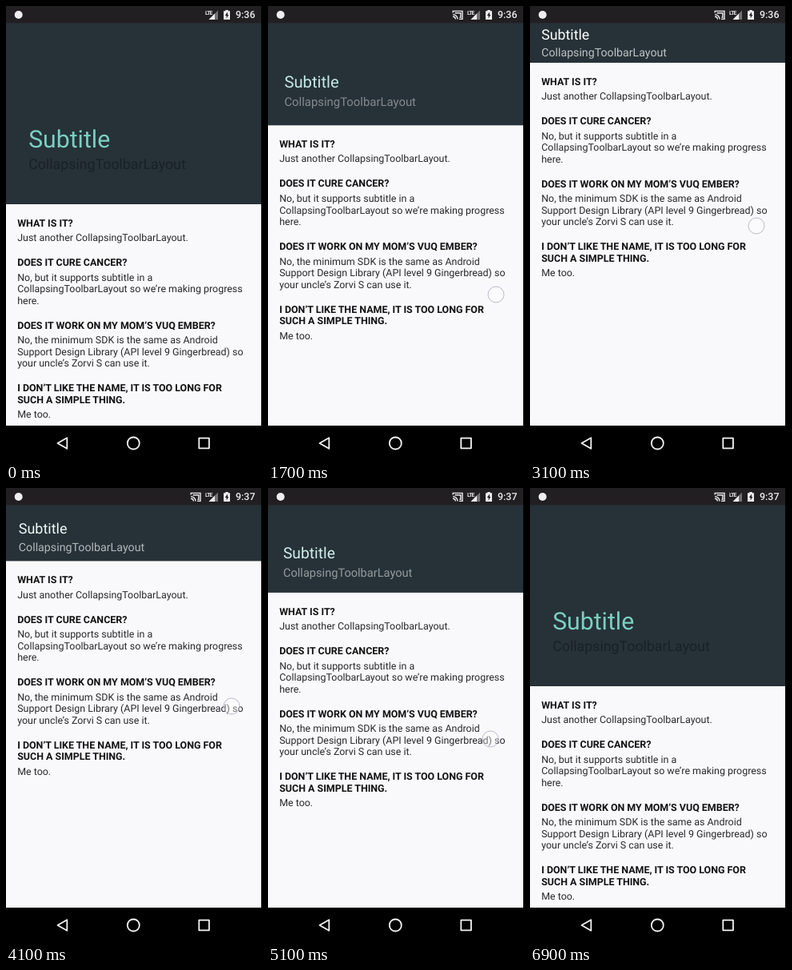
These frames come from a looping animation (320x568 px, 7000 ms). An HTML page:

```html
<!DOCTYPE html>
<html lang="en">
<head>
<meta charset="utf-8">
<title>Collapsing toolbar with subtitle</title>
<style>
  html, body { margin: 0; width: 100%; height: 100%; overflow: hidden; background: #000; }
  svg { display: block; width: 320px; height: 568px; }
  text { font-family: Roboto, sans-serif; text-rendering: geometricPrecision; white-space: pre; }
  #content text { font-size: 12.44px; fill: #29282b; }
  #content .heading { font-weight: 700; fill: #111; }
</style>
</head>
<body>
<svg viewBox="0 0 320 568">
  <rect width="320" height="568" fill="#f9f8fa"/>
  <g id="content"></g>
  <rect id="header" width="320" fill="#263238"/>
  <text id="title">Subtitle</text>
  <text id="subtitle">CollapsingToolbarLayout</text>

  <rect width="320" height="21.3" fill="#221f22"/>
  <g fill="#eee">
    <circle cx="15.7" cy="11" r="5"/>
    <g id="cast" fill="none" stroke="#eee" stroke-width="1.4">
      <path d="M231.2 8.5V6.4H243V16.4H239M231 10.6a6 6 0 0 1 6 6M231 13.2a3.4 3.4 0 0 1 3.4 3.4"/>
      <path d="M233.5 8.8H240.8V14.2H239.5"/>
    </g>
    <text x="249" y="10.8" font-size="6.8" font-weight="700" letter-spacing="-.8">LTE</text>
    <path d="M265 5.5V17H253.5Z" opacity=".4"/>
    <path d="M261 9.5V17H253.5Z"/>
    <path d="M274.3 6.2V5H277.7V6.2H280V17H272V6.2Z"/>
    <path d="M277 7.5L273.8 12H275.6V15.5L278.4 11H277Z" fill="#221f22"/>
    <text id="clock" x="287" y="15.4" font-size="12.44" font-weight="500"></text>
  </g>

  <rect y="525" width="320" height="43"/>
  <rect x="319" width="1" height="568"/>
  <g fill="none" stroke="#f4f4f4" stroke-width="1.8" stroke-linejoin="round">
    <path d="M64.5 547L76.3 540.2V553.8Z"/>
    <circle cx="159.3" cy="547" r="7.5"/>
    <rect x="241.3" y="540.7" width="12.6" height="12.6"/>
  </g>
  <circle id="touch" r="10" fill="#fff" fill-opacity=".35" stroke="#a3a9bd" stroke-opacity=".75"/>
</svg>
<script>
const LOOP = 7000, STEP = 100;
const COLLAPSED = 70, EXPANDED = 247;
const $ = id => document.getElementById(id);
const set = (el, attrs) => { for (const k in attrs) el.setAttribute(k, attrs[k]); };
const lerp = (a, b, p) => a + (b - a) * p;
const mix = (a, b, p) => `rgb(${a.map((v, i) => Math.round(lerp(v, b[i], p)))})`;

// Each block: heading lines, then body lines
const blocks = [
  [['WHAT IS IT?'], ['Just another CollapsingToolbarLayout.']],
  [['DOES IT CURE CANCER?'],
   ['No, but it supports subtitle in a', 'CollapsingToolbarLayout so we’re making progress', 'here.']],
  [['DOES IT WORK ON MY MOM’S VUQ EMBER?'],
   ['No, the minimum SDK is the same as Android',
    'Support Design Library (API level 9 Gingerbread) so', 'your uncle’s Zorvi S can use it.']],
  [['I DON’T LIKE THE NAME, IT IS TOO LONG FOR', 'SUCH A SIMPLE THING.'], ['Me too.']],
];

function buildContent() {
  let y = 28.7;
  const addLines = (lines, cls, gap) => {
    for (const line of lines) {
      const el = document.createElementNS('http://www.w3.org/2000/svg', 'text');
      set(el, { x: 14.2, y, class: cls });
      el.textContent = line;
      $('content').append(el);
      y += 14.58;
    }
    y += gap;
  };
  for (const [heading, body] of blocks) {
    addLines(heading, 'heading', 3.9);
    addLines(body, 'body', 16.4);
  }
}

// Smooth monotone curve through [time, value] keys, at rest at both ends
function curve(keys) {
  const rate = i => (keys[i + 1][1] - keys[i][1]) / (keys[i + 1][0] - keys[i][0]);
  const slopes = keys.map((_, i) => {
    if (i === 0 || i === keys.length - 1) return 0;
    const a = rate(i - 1), b = rate(i);
    return a * b <= 0 ? 0 : 2 * a * b / (a + b);
  });
  return t => {
    if (t <= keys[0][0]) return keys[0][1];
    const i = keys.findIndex(k => k[0] > t) - 1;
    if (i < 0) return keys[keys.length - 1][1];
    const [t0, v0] = keys[i], [t1, v1] = keys[i + 1];
    const d = t1 - t0, u = (t - t0) / d, w = 1 - u;
    return v0 * (1 + 2 * u) * w * w + v1 * u * u * (3 - 2 * u)
         + d * u * w * (slopes[i] * w - slopes[i + 1] * u);
  };
}

const headerBottom = curve([[800, 247], [1700, 148.3], [2900, 70], [3600, 70], [4100, 90.4],
  [4400, 103], [5200, 135], [5800, 185.6], [6000, 206], [6550, 247]]);

const touches = [
  { from: 900, to: 3200, x: curve([[900, 285], [1700, 285], [2900, 283]]),
    y: curve([[800, 461], [1700, 361], [2900, 275]]) },
  { from: 3700, to: 6800, x: curve([[4100, 282], [5100, 278], [5800, 275]]),
    y: curve([[3600, 251], [4100, 273], [5100, 314], [5800, 377], [6600, 448]]) },
];

function draw(t) {
  const bottom = headerBottom(t);
  const p = (bottom - COLLAPSED) / (EXPANDED - COLLAPSED);
  const x = lerp(14.2, 28.2, p);

  set($('content'), { transform: `translate(0 ${bottom})` });
  set($('header'), { height: bottom + 1 });
  set($('title'), { x, y: lerp(41.6, 177.2, p), 'font-size': lerp(17.8, 30.2, p * p),
    fill: mix([255, 255, 255], [124, 207, 194], p) });
  set($('subtitle'), { x, y: lerp(63.2, 203.5, p), 'font-size': lerp(14.2, 17.8, p * p),
    fill: mix([190, 194, 196], [25, 33, 37], p ** 1.3) });

  set($('cast'), { visibility: t < 100 ? 'hidden' : 'visible' });
  $('clock').textContent = t < 3400 ? '9:36' : '9:37';

  const touch = touches.find(k => t >= k.from && t < k.to);
  set($('touch'), touch
    ? { visibility: 'visible', cx: touch.x(t), cy: touch.y(t) }
    : { visibility: 'hidden' });
}

function tick() {
  draw(Math.floor(performance.now() % LOOP / STEP) * STEP);
  requestAnimationFrame(tick);
}

buildContent();
tick();
</script>
</body>
</html>
```
